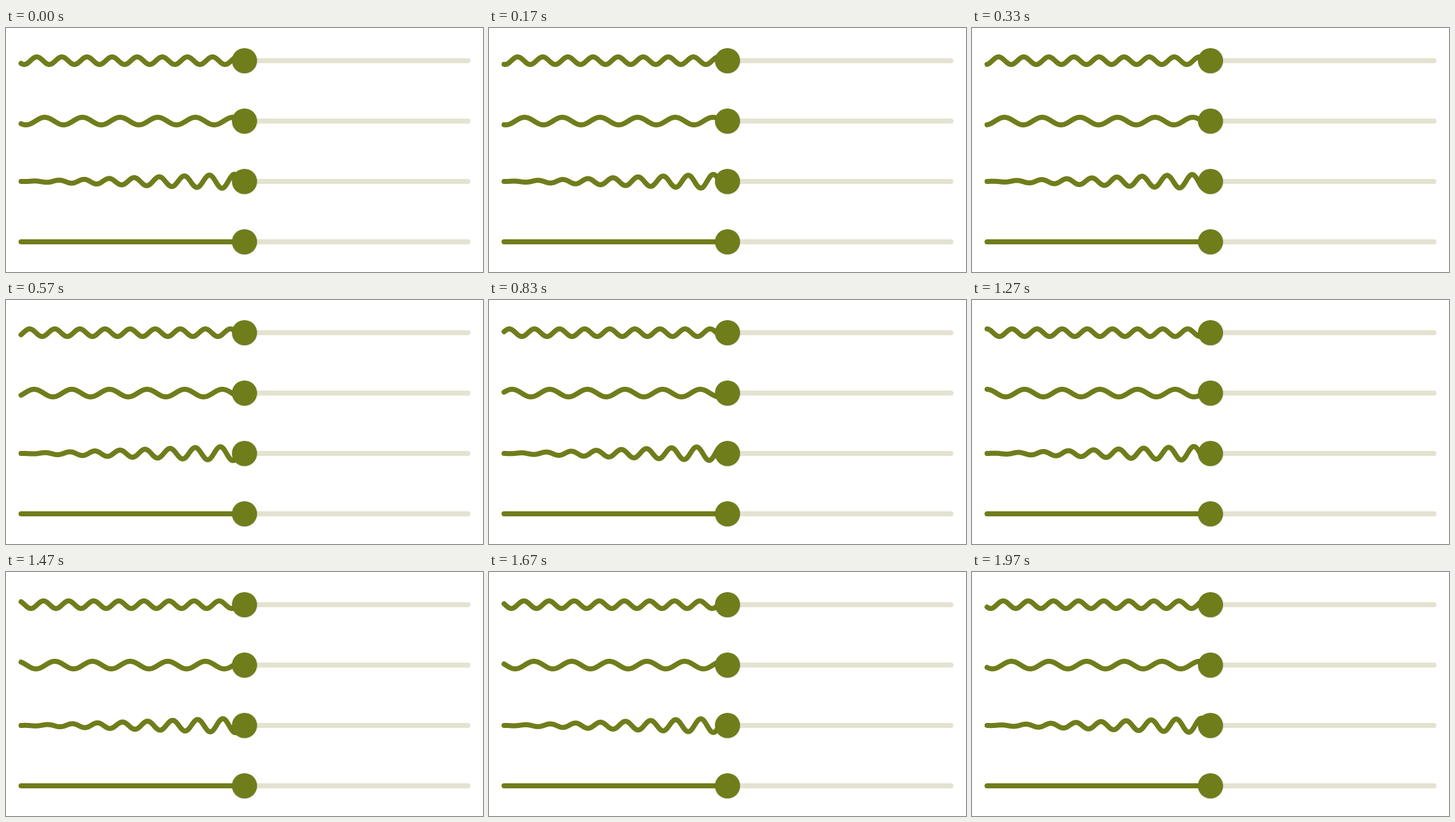
Write an HTML page with a canvas that moves like this. It is 760x388 px and loops after 2010 ms.

```html
<!DOCTYPE html>
<html lang="en">
<head>
<meta charset="utf-8">
<title>Wavy sliders</title>
<style>
  html, body { margin: 0; width: 100%; height: 100%; overflow: hidden; background: #fff; }
  canvas { display: block; }
</style>
</head>
<body>
<canvas id="stage" width="760" height="388"></canvas>
<script>
const ctx = document.getElementById('stage').getContext('2d');
const ACTIVE = '#707d1b', TRACK = '#e4e3d2';
const LEFT = 24, THUMB = 380, RIGHT = 736, RADIUS = 20;
const LOOP = 2010, STEP = 100 / 3, STEPS = 60;

// crest: position of one wave top at time 0; speed: px per ms to the left
const sliders = [
  { y: 52, amp: 6, length: 40, crest: 49, speed: 0.02 },
  { y: 148, amp: 6, length: 60, crest: 61.8, speed: 0.03 },
  { y: 244, amp: 12, length: 40, crest: 324, speed: 0.04, grows: true },
  { y: 340, amp: 0, length: 40, crest: 0, speed: 0 }
];

function waveY(s, x, time) {
  const amp = s.grows ? s.amp * (x - LEFT) / (THUMB - LEFT) : s.amp;
  const phase = (x - s.crest + s.speed * time) / s.length;
  return s.y - amp * Math.cos(2 * Math.PI * phase);
}

function drawSlider(s, time) {
  ctx.strokeStyle = TRACK;
  ctx.beginPath();
  ctx.moveTo(THUMB, s.y);
  ctx.lineTo(RIGHT, s.y);
  ctx.stroke();

  ctx.strokeStyle = ACTIVE;
  ctx.beginPath();
  for (let x = LEFT; x <= THUMB; x++) ctx.lineTo(x, waveY(s, x, time));
  ctx.stroke();

  ctx.save();
  ctx.shadowColor = 'rgba(0, 0, 0, 0.2)';
  ctx.shadowBlur = 2;
  ctx.shadowOffsetY = 0.7;
  ctx.fillStyle = ACTIVE;
  ctx.beginPath();
  ctx.arc(THUMB, s.y, RADIUS, 0, 2 * Math.PI);
  ctx.fill();
  ctx.restore();
}

// The picture advances 30 times a second, on 10 ms ticks
function stepAt(ms) {
  const tick = Math.floor((ms % LOOP) / 10) * 10;
  return Math.min(STEPS - 1, Math.floor((tick + 5) / STEP));
}

let start;
function frame(now) {
  if (start === undefined) start = now;
  const time = stepAt(Math.max(0, now - start)) * STEP;
  ctx.fillStyle = '#fff';
  ctx.fillRect(0, 0, 760, 388);
  ctx.lineWidth = 8;
  ctx.lineCap = ctx.lineJoin = 'round';
  for (const s of sliders) drawSlider(s, time);
  requestAnimationFrame(frame);
}
requestAnimationFrame(frame);
</script>
</body>
</html>
```
